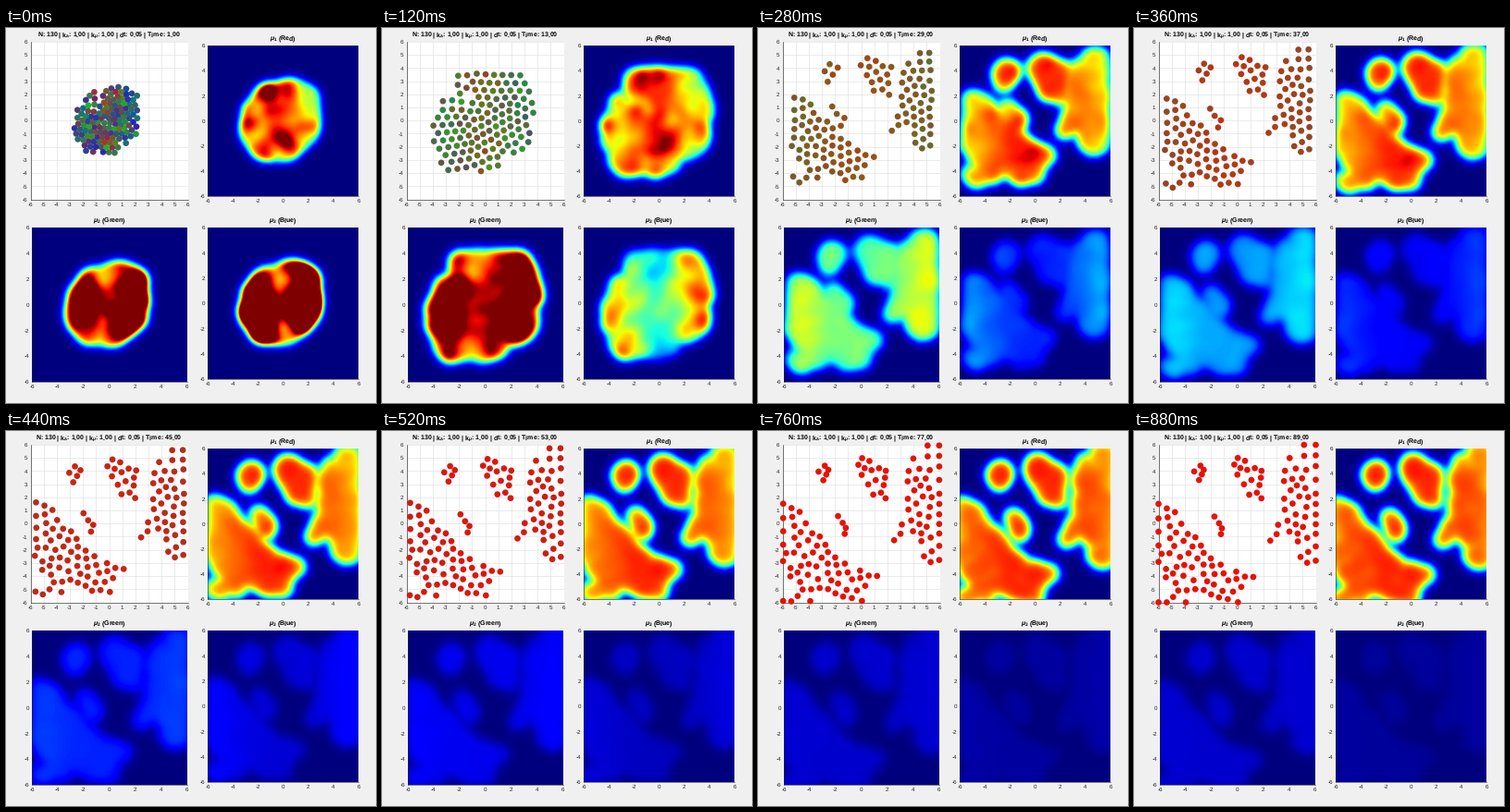
Recreate the animation shown at these times as a matplotlib script. Size 400 by 406 pixels, loop 920 ms.

```python
import numpy as np
import matplotlib.pyplot as plt
from matplotlib.animation import FuncAnimation
from matplotlib.path import Path

W, H, DPI = 400, 406, 64
FRAMES, INTERVAL = 23, 40
PX = 72 / DPI                      # points per pixel
WALL, SIGMA, COVER = 6, 0.5, 1.2
rng = np.random.default_rng(4)

plt.rcParams.update({
    "font.family": "Liberation Sans",
    "axes.unicode_minus": False,
    "text.hinting": "none",
    "mathtext.fontset": "custom",
    "mathtext.default": "rm",
    "mathtext.rm": "Liberation Sans:bold",
    "mathtext.it": "Liberation Sans:bold:italic",
})


def fill(n, outline):
    """Spread n points evenly over a polygon, held inside the walls."""
    shape = Path(outline)
    low, high = np.min(outline, 0), np.max(outline, 0)
    pts = np.empty((0, 2))
    while len(pts) < n:
        c = rng.uniform(low, high, (400, 2))
        c = np.clip(c[shape.contains_points(c)], -WALL, WALL)
        gap = np.linalg.norm(c[:, None] - pts[None], axis=2).min(1, initial=99)
        pts = np.vstack([pts, c[gap.argmax()]])
    return pts


def relax(p, gap, pull=0.0, wall=WALL, steps=50):
    """Push apart points closer than gap while pulling all to the middle."""
    for _ in range(steps):
        d = p[:, None] - p[None]
        r = np.linalg.norm(d, axis=2) + 1e-6
        push = np.clip(gap - r, 0, None) / r * 0.25
        p = np.clip(p * (1 - pull) + (push[..., None] * d).sum(1), -wall, wall)
    return p


# Each body: size, final outline, centres at start, spread, tearing, end
BODIES = [
    (5, [(-3.3, 4.0), (-2.7, 4.5), (-2.3, 3.7), (-2.9, 3.3)],
     [(-1.4, 2.1), (-1.9, 3.3), (-2.3, 3.7), (-2.8, 3.9)]),
    (15, [(-.5, 4.4), (0, 5.1), (1.9, 4.1), (1.9, 1.8), (1.2, 1.8), (.4, 2.8)],
     [(.4, 1.9), (.4, 2.8), (1.3, 3.4), (1, 3.5)]),
    (44, [(5.4, 6.4), (6.5, 6.4), (6.5, -2.7), (5.6, -3.2), (4.7, -2.7),
          (3.8, -.4), (2.3, -1.5), (3.6, .8), (3.5, 3.8), (4.0, 5.0)],
     [(1.4, .3), (2.4, .5), (4.4, 1.3), (5, 1.2)]),
    (4, [(-1.9, .6), (-1.6, .6), (-.9, -.6), (-1.3, -.9)],
     [(-.2, .6), (-.2, .8), (-1.8, .2), (-1.4, -.3)]),
    (62, [(-6.5, 1.9), (-4.4, .9), (-4.1, -.6), (-2.8, -1.2), (-1.8, -2.6),
          (0, -3.7), (1.8, -3.5), (.4, -5.0), (.2, -6.2), (-3.2, -5.0),
          (-3.9, -6.3), (-6.4, -6.3), (-4.9, -5.0), (-6.4, -3.0)],
     [(-1.1, -.9), (-1.6, -1.6), (-2.6, -1.9), (-3, -3)]),
]
SCALES = [0.42, 0.6, 0.8, 1]
STAGES = [0, 3, 7, 22]

# Every body shrinks about its own centre towards the start
groups = [fill(n, outline) for n, outline, _ in BODIES]
start, spread, torn, end = (
    np.vstack([np.array(path[k]) + s * (g - path[-1])
               for g, (_, _, path) in zip(groups, BODIES)])
    for k, s in enumerate(SCALES))
N = len(end)
start = start + rng.normal(0, 0.25, (N, 2))
pos = [relax(start, 0.45, 0.004, wall=3), relax(spread, 0.72, 0.004),
       relax(torn, 0.66), end]

edge = (pos[2][:, :1] / WALL) ** 2
noise = rng.normal(0, 0.5, (N, 3))


def clock(t):
    """Time that slows down as the swarm settles."""
    return 1 - np.exp(-np.asarray(t) / 6)


def place(t):
    k = min(np.searchsorted(STAGES, t, side="right") - 1, len(STAGES) - 2)
    a, b = clock(STAGES[k:k + 2])
    u = (clock(t) - a) / (b - a)
    return pos[k] + u * (pos[k + 1] - pos[k])


def levels(t):
    """Red, green and blue strength of every particle."""
    base = np.array([0.9,
                     0.07 + 0.85 * np.exp(-(t - 2) ** 2 / 36),
                     0.02 + 0.66 * np.exp(-t / 4.5)])
    rim = 1 + np.exp(-t / 15) * edge * np.array([-0.45, 0.6, 1.8])
    return base * rim * np.exp(noise * np.exp(-t / 4))


grid = np.linspace(-WALL, WALL, 121)


def bell(c):
    return np.exp(-(grid[:, None] - c) ** 2 / (2 * SIGMA**2))


def panel(x0, x1, top, bottom, step):
    ax = fig.add_axes([x0 / W, 1 - bottom / H, (x1 - x0) / W, (bottom - top) / H])
    ticks = np.arange(-WALL, WALL + 1, step)
    ax.set(xlim=(-WALL, WALL), ylim=(-WALL, WALL), xticks=ticks, yticks=ticks)
    ax.tick_params(length=0, labelsize=6.2 * PX, labelcolor="#262626", pad=3 * PX)
    for side, line in ax.spines.items():
        line.set(linewidth=0.6 * PX, color="#262626",
                 visible=side in ("left", "bottom"))
    return ax


def title(x, y, text):
    return fig.text(x / W, 1 - y / H, text, size=6.95 * PX, weight="bold",
                    ha="center", va="baseline")


fig = plt.figure(figsize=(W / DPI, H / DPI), dpi=DPI, facecolor="#f0f0f0")

swarm = panel(26.5, 196.5, 15, 185.5, 1)
swarm.set_axisbelow(True)
swarm.grid(color="#dfdfdf", linewidth=0.6 * PX)
dots = swarm.scatter(*pos[0].T, s=(6.7 * PX) ** 2, linewidths=0,
                     clip_on=False, zorder=3)
caption = title(111.5, 9.5, "")

maps = []
for i, (name, box) in enumerate([
        ("Red", (218, 381, 19, 182)),
        ("Green", (28, 195.5, 216, 383)),
        ("Blue", (218, 381, 216, 380))]):
    ax = panel(*box, 2)
    maps.append(ax.imshow(np.zeros((121, 121)), cmap="jet", vmin=0, vmax=1,
                          origin="lower", aspect="auto",
                          extent=(-WALL, WALL, -WALL, WALL),
                          interpolation="bilinear"))
    title((box[0] + box[1]) / 2, box[2] - 5.5,
          rf"$\mathit{{\mu}}_{i + 1}$ ({name})")


def update(i):
    p, c = place(i), levels(i)
    dots.set_offsets(p)
    dots.set_facecolors(np.clip(c / c.sum(1, keepdims=True), 0, 1))
    bx, by = bell(p[:, 0]), bell(p[:, 1])
    crowd = by @ bx.T + 1e-9
    cover = -np.expm1(-COVER * crowd) / crowd
    for k, im in enumerate(maps):
        im.set_data((by * c[:, k]) @ bx.T * cover)
    caption.set_text(rf"N: {N} | k$_a$: 1.00 | k$_{{\mathit{{\mu}}}}$: 1.00"
                     f" | dt: 0.05 | Time: {1 + 4 * i:.2f}")
    return [dots, caption, *maps]


anim = FuncAnimation(fig, update, frames=FRAMES, init_func=lambda: update(0),
                     interval=INTERVAL, repeat=True, repeat_delay=0, blit=False)
plt.show()
```
